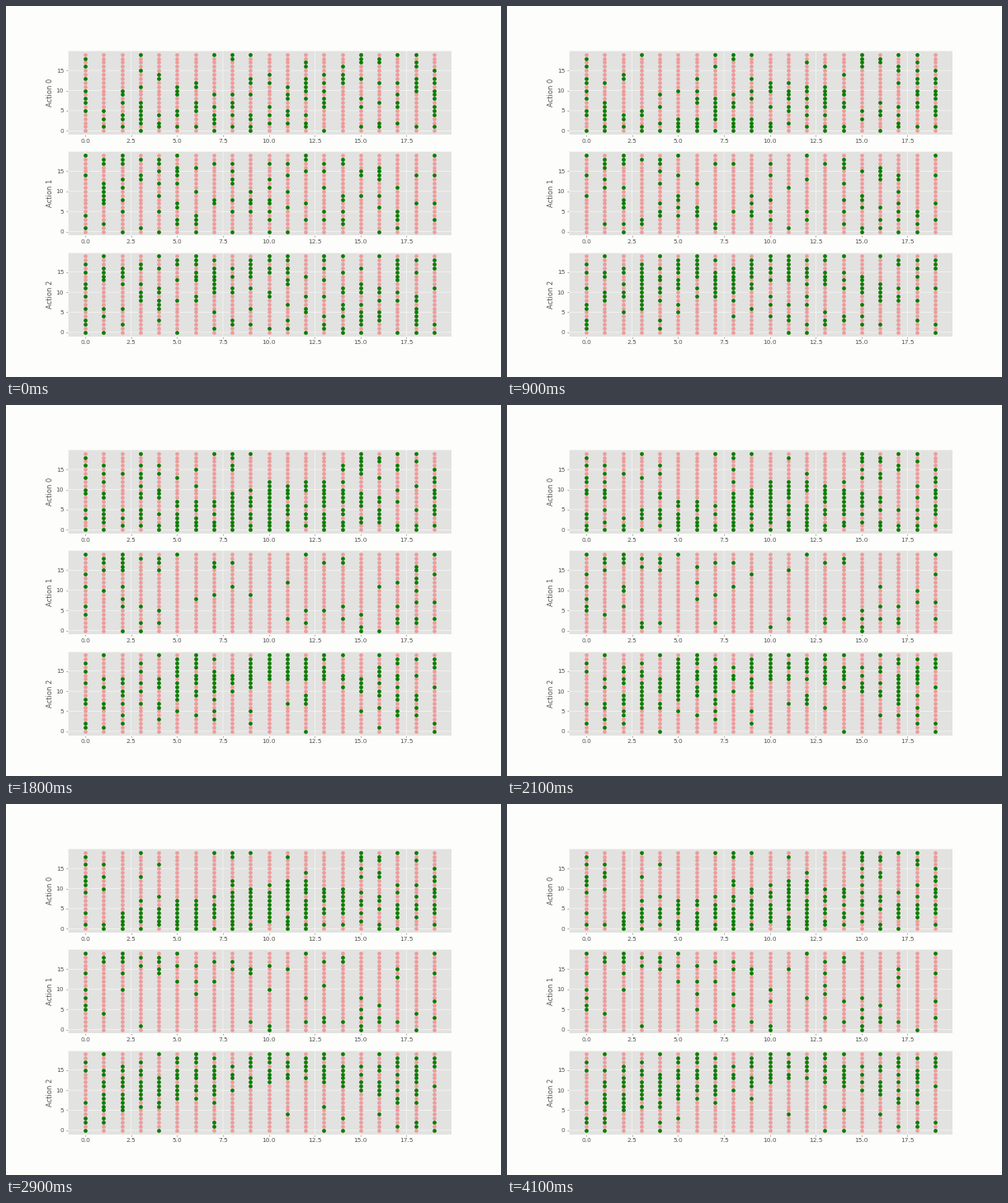
Recreate the animation shown at these times as a matplotlib script. Size 600 by 450 pixels, loop 4.2 s.

```python
import numpy as np
import matplotlib.pyplot as plt
from matplotlib.animation import FuncAnimation

N = 20          # states per axis
FRAMES = 42
LEARN_END = 18  # exploration up to here, then the policy settles
SETTLED = 24

PINK, GREEN = "#ee9a9a", "green"
PAPER, PANEL, INK = "#fdfdfb", "#e2e2e0", "#555555"

cols, rows = np.indices((N, N))


def reachable():
    """States that training visits; the others keep their first value."""
    body = (cols < N - 1) & (rows < 17) & ~((cols == 0) & (rows > 12))
    crest = (cols >= 10) & (cols <= 12) & (rows < 19)
    return body | crest


def history():
    """Best action per state for every step of the training."""
    rng = np.random.default_rng(7)
    seen = reachable()

    # Action 0 wins below an arch, action 2 above; clearest in the middle.
    arch = 5 + 7.5 * np.exp(-((cols - 11.5) / 5) ** 2)
    lean = np.where(rows <= arch, 0, 2)
    clarity = np.exp(-((cols - 9) / 9) ** 2)

    def draw(trust):
        guess = rng.integers(0, 3, (N, N))
        return np.where(rng.random((N, N)) < trust * clarity, lean, guess)

    grid = draw(0.25)
    goal = np.where(seen, draw(0.85), grid)
    settle_at = rng.integers(LEARN_END + 1, SETTLED + 1, (N, N))
    stray_from = rng.integers(SETTLED, FRAMES + 60, (N, N))
    stray_to = stray_from + rng.integers(3, 9, (N, N))
    stray = rng.integers(0, 3, (N, N))

    steps = [grid]
    for k in range(1, FRAMES):
        if k <= LEARN_END:
            hit = seen & (rng.random((N, N)) < 0.2)
            grid = np.where(hit, draw(0.4 + 0.4 * k / LEARN_END), grid)
        elif k <= SETTLED:
            grid = np.where(settle_at <= k, goal, grid)
        else:
            off = seen & (stray_from <= k) & (k < stray_to)
            grid = np.where(off, stray, goal)
        steps.append(grid)
    return steps


plt.rcParams.update({"font.family": "DejaVu Sans", "font.size": 10})
fig, axes = plt.subplots(3, 1, figsize=(12, 9), dpi=50, facecolor=PAPER)

points = np.column_stack([cols.ravel(), rows.ravel()])
steps = history()
dot = dict(s=36, linewidths=0.6)
winners = []

for i, ax in enumerate(axes):
    ax.set_facecolor(PANEL)
    ax.set_axisbelow(True)
    ax.grid(color=PAPER, lw=0.8, snap=False)
    for side in ax.spines.values():
        side.set(color=PAPER, linewidth=1)
    ax.set(xlim=(-0.95, 19.95), ylim=(-0.95, 19.95),
           xticks=np.arange(0, 18, 2.5), yticks=range(0, 20, 5))
    ax.tick_params(colors=INK, labelsize=10.6)
    ax.set_ylabel(f"Action {i}", color=INK, fontsize=12, labelpad=3.4)
    ax.scatter(*points.T, color=PINK, zorder=2, **dot)
    winners.append(ax.scatter([], [], color=GREEN, zorder=3, **dot))


def update(k):
    best = steps[k].ravel()
    for action, dots in enumerate(winners):
        dots.set_offsets(points[best == action])
    return winners


anim = FuncAnimation(fig, update, frames=FRAMES, interval=100,
                     repeat=True, repeat_delay=0)
plt.show()
```
